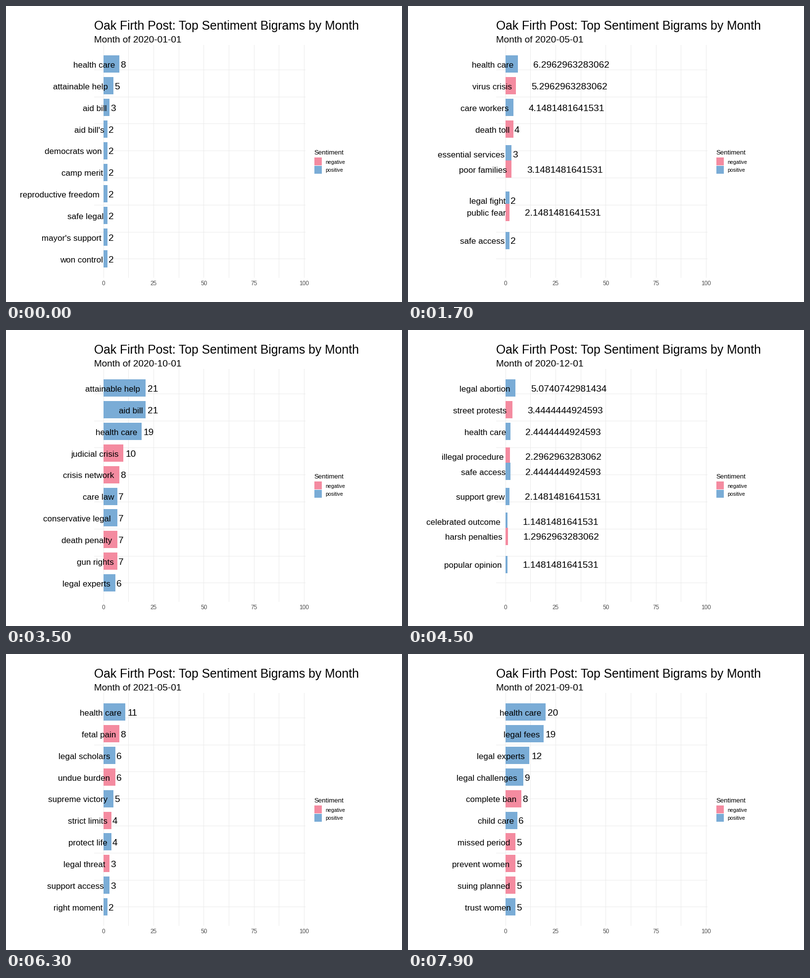
A matplotlib script that plays this animation: 800x600 px, repeating every 8 s.

```python
import matplotlib.pyplot as plt
from matplotlib.animation import FuncAnimation
from matplotlib.patches import Rectangle

plt.rcParams["font.family"] = "Liberation Sans"

W, H, DPI = 800, 600, 100
BLUE, PINK, GRID = "#7aacd6", "#f48ba0", "#ebebeb"
ZERO, UNIT = 196.6, 4.053         # x of value 0, pixels per count
TOP, PITCH, BAR = 117.8, 43.85, 35
EASE = 0.1481481641531            # cubic in-out at one third

# One line per month, "count: phrases"; a leading minus marks negative ones.
MONTHS = """
8: health care; 5: attainable help; 3: aid bill; 2: aid bill's, democrats won, camp merit, reproductive freedom, safe legal, mayor's support, won control
10: health care; 5: -undue burden; 4: rights supporters; 3: -admitting fears, medical benefit; 2: attainable help, -substantial restrictions, protect patients, -state limits, safe haven
20: health care; 5: rights supporters, -undue burden; 4: -coronavirus crisis, hope medical, protect women's; 3: hope clinic, -poor women; 2: attainable help, benefit analysis
13: health care; 4: -coronavirus outbreak, essential care; 3: safe distance, hope clinic, -essential restrictions, -poor women; 2: legal battle, protect patients, support workers
6: health care; 5: -virus crisis; 4: care workers, -death toll; 3: essential services, -poor families; 2: legal fight, -public fear, safe access, work freely
8: health care; 7: -undue burden; 5: legal victory; 4: -hospital delays, -racial injustice; 3: protect rights, -dissenting voices; 2: -burden test, right decision, won support
10: -undue burden; 5: -anti racism; 4: -structural racism, -substantial obstacle; 2: attainable help, aid bill, latino support, -law imposed, regulation's benefits; 1: alternately soothing
7: -racial injustice; 6: health care; 4: -economic crisis; 3: -police violence, support women; 2: -systemic inequality, liberal support, -lost jobs, progressive candidates, top issue
11: health care; 9: -death penalty; 7: attainable help; 6: -judicial crisis, legal scholars; 5: aid bill, -bitter fight; 4: conservative support, gun rights, -vacant seat
21: attainable help, aid bill; 19: health care; 10: -judicial crisis; 8: -crisis network; 7: care law, conservative legal, -death penalty, -gun rights; 6: legal experts
2: health care, -divided court; 1: attainable help, -bitter dispute, conservative majority, enough votes, -hard choices, progressive leaders, support grew, won easily
3: legal abortion, -street protests; 2: health care, -illegal procedure, safe access, support grew; 1: celebrated outcome, -harsh penalties, popular opinion, top officials
17: health care; 6: -strict limits; 5: legal status, work reform; 4: -mass protests; 3: progressive agenda, -illegal clinics; 2: approved measure, -broken system, winning votes
6: health care; 5: -total ban; 4: legal challenge, -severe illness; 3: support groups, -strict rules; 2: comprehensive support, -poor rural, right direction, top court
10: health care; 3: care workers; 2: care system, -complete lack; 1: 21 active, 31 top, -absolutists refused, active pills, active slots, activists hope
6: health care; 5: -total ban; 4: legal experts, -death threats; 3: medical benefits, -down syndrome; 2: protect patients, -risky choice, safe abortion, support women
11: health care; 8: -fetal pain; 6: legal scholars, -undue burden; 5: supreme victory; 4: -strict limits, protect life; 3: -legal threat, support access; 2: right moment
9: health care; 6: -private suits; 5: legal challenges, -strict bans; 4: protected rights, -denied communion, worthy candidates, -moral evil; 3: good standing, support law
4: -medical emergency, rights supporters, -temporarily blocked; 3: athletics integrity, integrity unit, justices agreed, legal system, -restrictive anti, -women pay; 2: -ban tolvey
8: -severe restrictions; 4: health care, -vigilante threat; 3: legal experts, -complete ban, protect patients; 2: -unconstitutional burden, legal fees, -missed chance, support women
20: health care; 19: legal fees; 12: legal experts; 9: legal challenges; 8: -complete ban; 6: child care; 5: -missed period, -prevent women, -suing planned, trust women
"""


def parse(line):
    """Turn a line into rows of (phrase, count, rank, is negative)."""
    rows = []
    for part in line.split(";"):
        count, words = part.split(":")
        for word in words.split(","):
            word = word.strip()
            rows.append((word.lstrip("-"), int(count), len(rows), word[0] == "-"))
    return rows


STATES = [parse(line) for line in MONTHS.strip().splitlines()]


def tween(a, b, f):
    """Pair the rows of each sentiment in rank order and blend them."""
    rows = []
    for neg in (False, True):
        old = [r for r in a if r[3] == neg]
        new = [r for r in b if r[3] == neg]
        for p, q in zip(old, new):
            word = p[0] if f < 0.5 else q[0]
            value = p[1] + (q[1] - p[1]) * f
            rank = p[2] + (q[2] - p[2]) * f
            rows.append((p[2], (word, value, rank, neg)))
    return [r for _, r in sorted(rows)]


fig = plt.figure(figsize=(W / DPI, H / DPI), dpi=DPI, facecolor="white")
ax = fig.add_axes([0, 0, 1, 1])
ax.set_xlim(0, W)
ax.set_ylim(H, 0)
ax.axis("off")


def label(x, y, s, px, color="black", ha="left", z=5):
    return ax.text(x, y, s, fontsize=px * 72 / DPI, color=color, ha=ha,
                   va="baseline", zorder=z)


def box(x, y, w, h, color, z=2):
    return ax.add_patch(Rectangle((x, y), w, h, fc=color, lw=0, zorder=z))


for i in range(9):
    x = ZERO + 12.5 * UNIT * i
    box(round(x), 79, 1, 472, GRID, 1)
    if i % 2 == 0:
        label(x + 0.5, 566, f"{12.5 * i:g}", 11.7, "#4d4d4d", "center")
for i in range(8):
    box(178, round(129 + 54.75 * i), 427, 1, GRID, 1)

label(178, 48, "Oak Firth Post: Top Sentiment Bigrams by Month", 24.8)
subtitle = label(178, 74, "", 19)

label(622, 301, "Sentiment", 13.3)
for y, name, color in ((307, "negative", PINK), (324, "positive", BLUE)):
    box(623, y, 15, 16, color)
    label(645, y + 12.5, name, 10.5)

bars = [box(ZERO, 0, 0, BAR, BLUE, 2 + i / 100) for i in range(10)]
words = [label(0, 0, "", 17, z=3) for _ in range(10)]
counts = [label(0, 0, "", 19, z=4) for _ in range(10)]


def width(text):
    return text.get_window_extent().width * DPI / fig.dpi


def draw(n):
    k, step = divmod(n, 4)
    month = k + (step >= 2)
    subtitle.set_text(f"Month of {2020 + month // 12}-{month % 12 + 1:02d}-01")
    if step in (1, 2):
        rows = tween(STATES[k], STATES[k + 1], EASE if step == 1 else 1 - EASE)
    else:
        rows = STATES[month]

    for i, (bar, word, count) in enumerate(zip(bars, words, counts)):
        shown = i < len(rows)
        for part in (bar, word, count):
            part.set_visible(shown)
        if not shown:
            continue
        name, value, rank, neg = rows[i]
        mid, end = TOP + PITCH * rank, ZERO + UNIT * value
        bar.set_bounds(ZERO, mid - BAR / 2, end - ZERO, BAR)
        bar.set_facecolor(PINK if neg else BLUE)
        word.set_text(name)
        count.set_text(f"{value:.15g}")
        word.set_position((end - 1.1 * width(word), mid + 7.2))
        count.set_position((end + 0.2 * width(count), mid + 7.2))
    return [subtitle, *bars, *words, *counts]


anim = FuncAnimation(fig, draw, frames=80, interval=100, repeat=True,
                     init_func=lambda: draw(0), blit=False)
plt.show()
```
